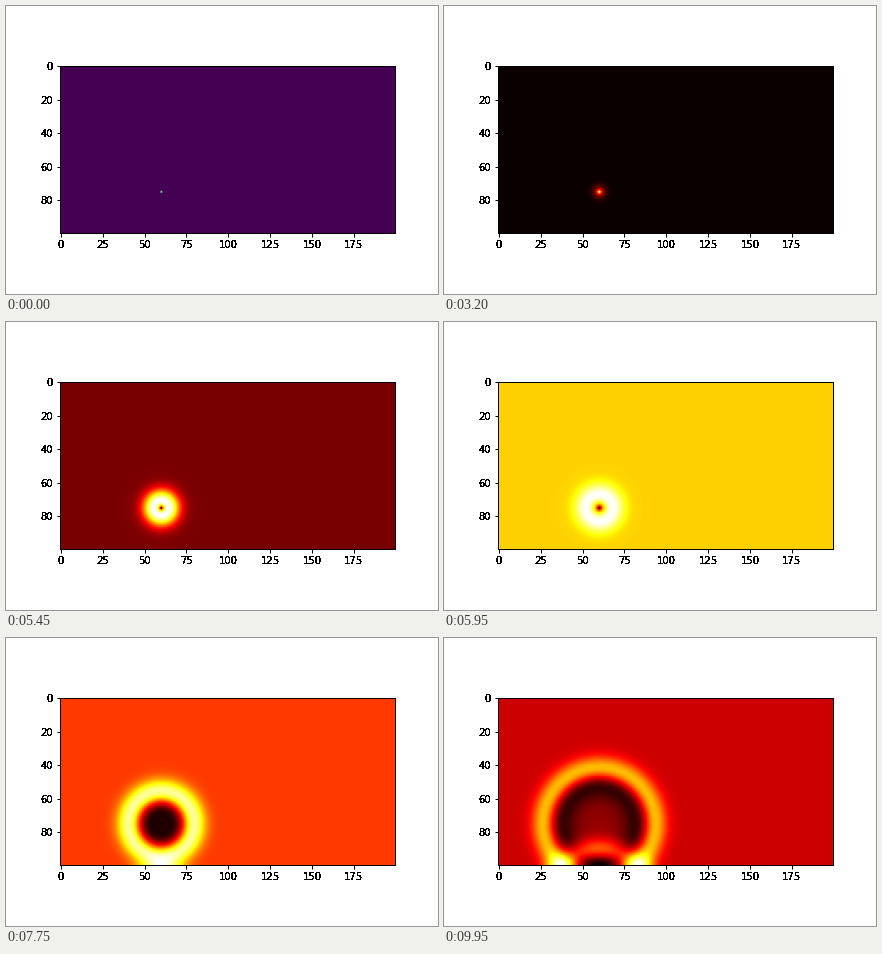
Animation of 432x288 px, one loop 10 s. Source, as a matplotlib script:

```python
import numpy as np
import matplotlib.pyplot as plt
from matplotlib.animation import FuncAnimation

FRAMES, INTERVAL = 200, 50
ROWS, COLS = 100, 200
SRC = (75, 60)      # row, column of the point source
SPEED = 0.315       # cells per step
CENTRE, WIDTH = 101.8, 25.0


def pulse(step):
    """First derivative of a Gaussian, positive lobe first."""
    x = (step - CENTRE) / WIDTH
    return -2 * x * np.exp(-x * x)


def laplacian(p):
    """Fourth-order Laplacian with reflecting walls."""
    q = np.pad(p, 2, mode="symmetric")
    rows, cols = q[:, 2:-2], q[2:-2, :]
    d2y = (16 * (rows[3:-1] + rows[1:-3]) - rows[4:] - rows[:-4] - 30 * p) / 12
    d2x = (16 * (cols[:, 3:-1] + cols[:, 1:-3])
           - cols[:, 4:] - cols[:, :-4] - 30 * p) / 12
    return d2x + d2y


def simulate():
    p = np.zeros((ROWS, COLS))
    old = p.copy()
    fields = []
    for step in range(FRAMES):
        new = 2 * p - old + SPEED ** 2 * laplacian(p)
        new[SRC] += pulse(step)
        old, p = p, new
        fields.append(p)
    return fields


def harden(img, dpi):
    """Turn soft glyph edges into solid black pixels."""
    out = np.zeros_like(img)
    out[..., 3] = img[..., 3] > 0.15
    return out, 0, 0


fields = simulate()

plt.rcParams["font.family"] = "DejaVu Sans"
fig, ax = plt.subplots(figsize=(6, 4), dpi=72, facecolor="white")
fig.subplots_adjust(left=0.125, right=0.9, bottom=0.125, top=0.88)
image = ax.imshow(fields[0], cmap="viridis")

ax.set_xticks(range(0, COLS, 25))
ax.set_yticks(range(0, ROWS, 20))
ax.tick_params(width=1, length=3.5, labelsize=10)
for spine in ax.spines.values():
    spine.set_linewidth(1)
for label in ax.get_xticklabels() + ax.get_yticklabels():
    label.set_agg_filter(harden)


def draw(i):
    field = fields[i]
    image.set_cmap("hot" if i else "viridis")
    image.set_data(field)
    image.set_clim(field.min(), field.max())
    return [image]


anim = FuncAnimation(fig, draw, frames=FRAMES, interval=INTERVAL,
                     repeat=True, repeat_delay=0, blit=False)
plt.show()
```
